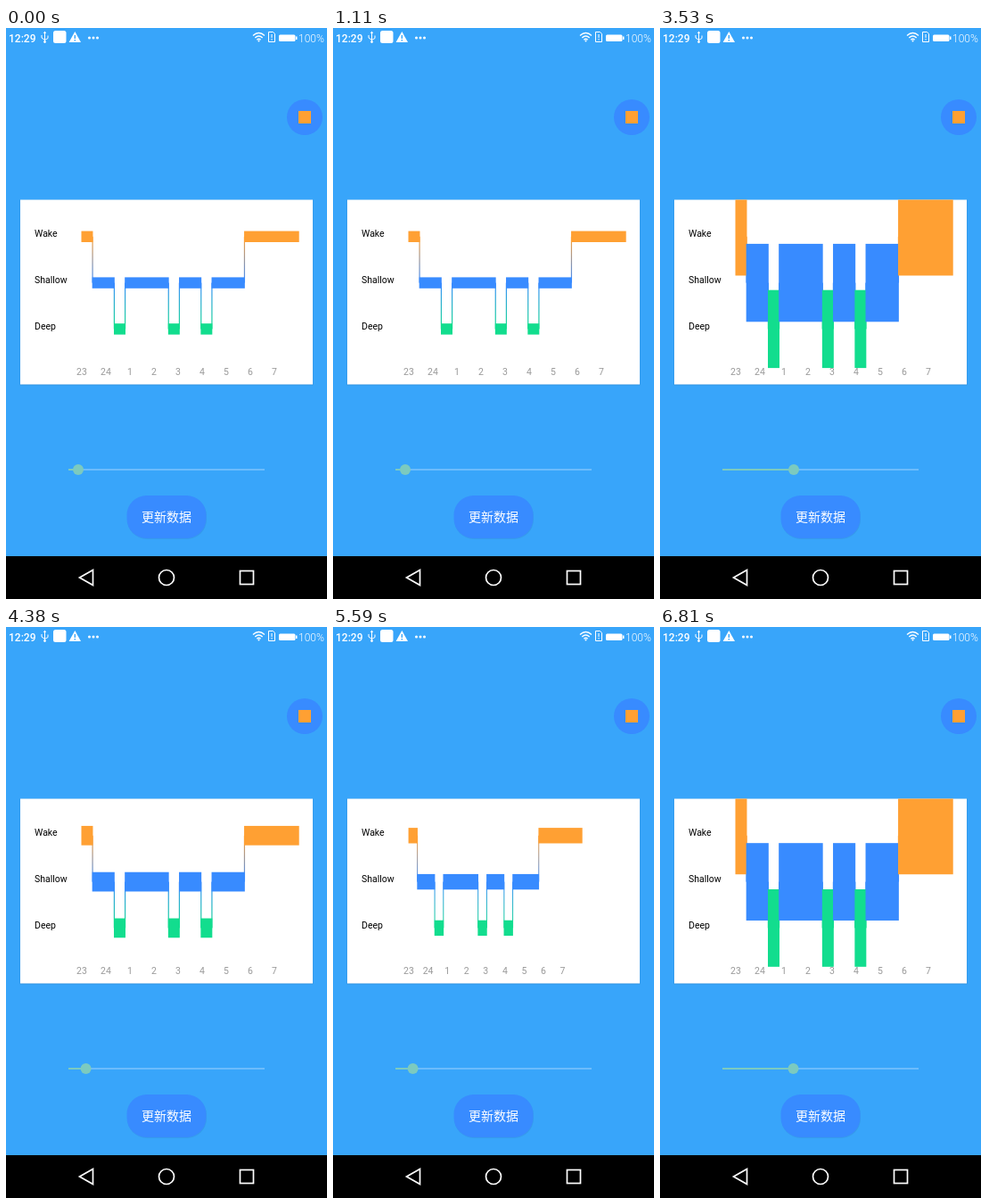
An HTML page for the animation above (8000 ms loop, 360x640 px).

```html
<!DOCTYPE html>
<html lang="zh">
<head>
<meta charset="utf-8">
<style>
html, body { margin: 0; width: 100%; height: 100%; overflow: hidden; background: #38a5fa; }
svg { display: block; width: 360px; height: 640px; font-family: Roboto, "Noto Sans", sans-serif; }
</style>
</head>
<body>
<svg viewBox="0 0 360 640">
  <defs>
    <clipPath id="card"><rect x="16" y="192.5" width="328" height="207"/></clipPath>
    <linearGradient id="wake" gradientUnits="userSpaceOnUse" x1="0" x2="0" y1="233.8" y2="285.6">
      <stop stop-color="#ffa033"/><stop offset="1" stop-color="#388bff"/>
    </linearGradient>
    <linearGradient id="deep" gradientUnits="userSpaceOnUse" x1="0" x2="0" y1="285.6" y2="337.4">
      <stop stop-color="#388bff"/><stop offset="1" stop-color="#12dd8e"/>
    </linearGradient>
  </defs>
  <rect width="360" height="640" fill="#38a5fa"/>

  <!-- status bar -->
  <g fill="#fff">
    <text x="3" y="15.7" font-size="12" font-weight="500">12:29</text>
    <g fill="none" stroke="#fff">
      <path d="M43.500 5V16M40 8V11L43.500 13.500L47 11.500V8.500"/>
      <circle cx="43.500" cy="15.500" r="1" fill="#fff"/>
      <path d="M41.800 6L43.500 3.500L45.200 6Z" fill="#fff" stroke="none"/>
    </g>
    <rect x="53" y="3" width="14.500" height="14" rx="2.500"/>
    <path d="M77.300 4L84 16H70.600Z"/>
    <path d="M77.300 8V12M77.300 13V14.500" stroke="#38a5fa" stroke-width="1.400"/>
    <circle cx="93.500" cy="11" r="1.500"/><circle cx="98" cy="11" r="1.500"/><circle cx="102.500" cy="11" r="1.500"/>
    <g fill="none" stroke="#fff" stroke-width="1.300">
      <path d="M277 8.500Q283.500 2.500 290 8.500M279.300 11Q283.500 7 287.700 11M281.400 13.200Q283.500 11.300 285.600 13.200"/>
      <path d="M294.500 4.500H299.500L301.500 6.500V15.500H294.500Z" stroke-width="1"/>
      <path d="M298 7V11M298 12V13.500" stroke-width="1"/>
    </g>
    <circle cx="283.500" cy="14.500" r="1"/>
    <rect x="306" y="7.500" width="18.500" height="7.500" rx="1.500"/>
    <rect x="325" y="9.500" width="1.500" height="3.500"/>
    <text x="328" y="15.700" font-size="12" font-weight="300">100%</text>
  </g>

  <circle cx="335" cy="100" r="20" fill="#388bff"/>
  <rect x="328" y="93" width="14" height="14" fill="#ffa033"/>

  <!-- chart card -->
  <rect x="15.500" y="192.500" width="329" height="208" fill="#000" opacity=".1"/>
  <rect x="16" y="192.500" width="328" height="207" fill="#fff"/>
  <g id="chart" clip-path="url(#card)"></g>
  <g font-size="10.500">
    <text x="32" y="234">Wake</text>
    <text x="32" y="285.600">Shallow</text>
    <text x="32" y="337.500">Deep</text>
  </g>
  <g id="hours" font-size="10.500" fill="#999" text-anchor="middle"></g>

  <!-- slider -->
  <rect x="70" y="494" width="220" height="2" fill="#fff" opacity=".26"/>
  <rect id="filled" x="70" y="494" height="2" fill="#7ccabf"/>
  <circle id="thumb" cy="495" r="6" fill="#7ccabf"/>

  <rect x="136" y="525" width="89" height="48" rx="22" fill="#000" opacity=".06"/>
  <rect x="135.500" y="524" width="89" height="48" rx="22" fill="#388bff"/>
  <text x="180" y="553.300" font-size="14" fill="#fff" text-anchor="middle" font-family="'Noto Sans CJK SC', 'Noto Sans CJK', sans-serif">更新数据</text>

  <!-- navigation bar -->
  <rect y="592" width="360" height="48"/>
  <g fill="none" stroke="#fff" stroke-width="1.700">
    <path d="M82.500 616L97.500 607.500V624.500Z"/>
    <circle cx="180" cy="616" r="8.500"/>
    <rect x="262.500" y="608.500" width="15" height="15"/>
  </g>
</svg>
<script>
const LOOP = 8000, STEP = 60, LEFT = 84.9, UNIT = 12.17, HOUR = 27;
const levels = [233.8, 285.6, 337.4];
const colors = ['#ffa033', '#388bff', '#12dd8e'];
// sleep stages as [level, length]
const stages = [[0, 1], [1, 2], [2, 1], [1, 4], [2, 1], [1, 2], [2, 1], [1, 3], [0, 5]];
const drags = [
  { at: 3110, from: 81, to: 150 },
  { at: 3960, from: 150, to: 89.6 },
  { at: 6380, from: 89.6, to: 149.5 }
];
const replays = [{ at: 500, delay: 102 }, { at: 5110, delay: 128 }];

const $ = id => document.getElementById(id);
function add(parent, tag, attrs) {
  const el = document.createElementNS('http://www.w3.org/2000/svg', tag);
  set(el, attrs);
  return parent.appendChild(el);
}
function set(el, attrs) {
  for (const k in attrs) el.setAttribute(k, attrs[k]);
}

const links = stages.slice(1).map(([level], i) => {
  const pair = [level, stages[i][0]], top = Math.min(...pair);
  return add($('chart'), 'rect', {
    y: levels[top], height: levels[1] - levels[0], fill: `url(#${top ? 'deep' : 'wake'})`
  });
});
const bars = stages.map(([level]) => add($('chart'), 'rect', { fill: colors[level] }));
const hours = [23, 24, 1, 2, 3, 4, 5, 6, 7].map(n => {
  const el = add($('hours'), 'text', { y: 389 });
  el.textContent = n;
  return el;
});

// the screen refreshes in fixed steps during each gesture
const elapsed = (t, at) => Math.floor((t - at) / STEP) * STEP;

function sliderX(t) {
  let x = drags[0].from;
  for (const d of drags) {
    if (t < d.at) break;
    const u = Math.min(1, (elapsed(t, d.at) + STEP) / 480);
    x = d.from + (d.to - d.from) * (1 - (1 - u) ** 2.5);
  }
  return x;
}

function growth(t) {
  let p = 1;
  for (const r of replays) {
    const u = (elapsed(t, r.at) - r.delay) / 500;
    if (u >= 0) p = (1 - Math.cos(Math.PI * Math.min(1, u))) / 2;
  }
  return p;
}

function draw(t) {
  const x = sliderX(t), p = growth(t);
  const height = 1.087 * (x - 69.6) * p, line = 0.3 + 0.9 * p, lap = 0.4 * p;
  let pos = 0;
  stages.forEach(([level, length], i) => {
    const left = LEFT + pos * UNIT * p;
    if (i) set(links[i - 1], { x: left - line / 2, width: line });
    set(bars[i], {
      x: left - lap, width: length * UNIT * p + 2 * lap,
      y: levels[level] - height / 2, height
    });
    pos += length;
  });
  hours.forEach((el, i) => set(el, { x: 85 + i * HOUR * p }));
  set($('filled'), { width: x - 70 });
  set($('thumb'), { cx: x });
}

const start = performance.now();
function frame() {
  draw((performance.now() - start) % LOOP);
  requestAnimationFrame(frame);
}
frame();
</script>
</body>
</html>
```
